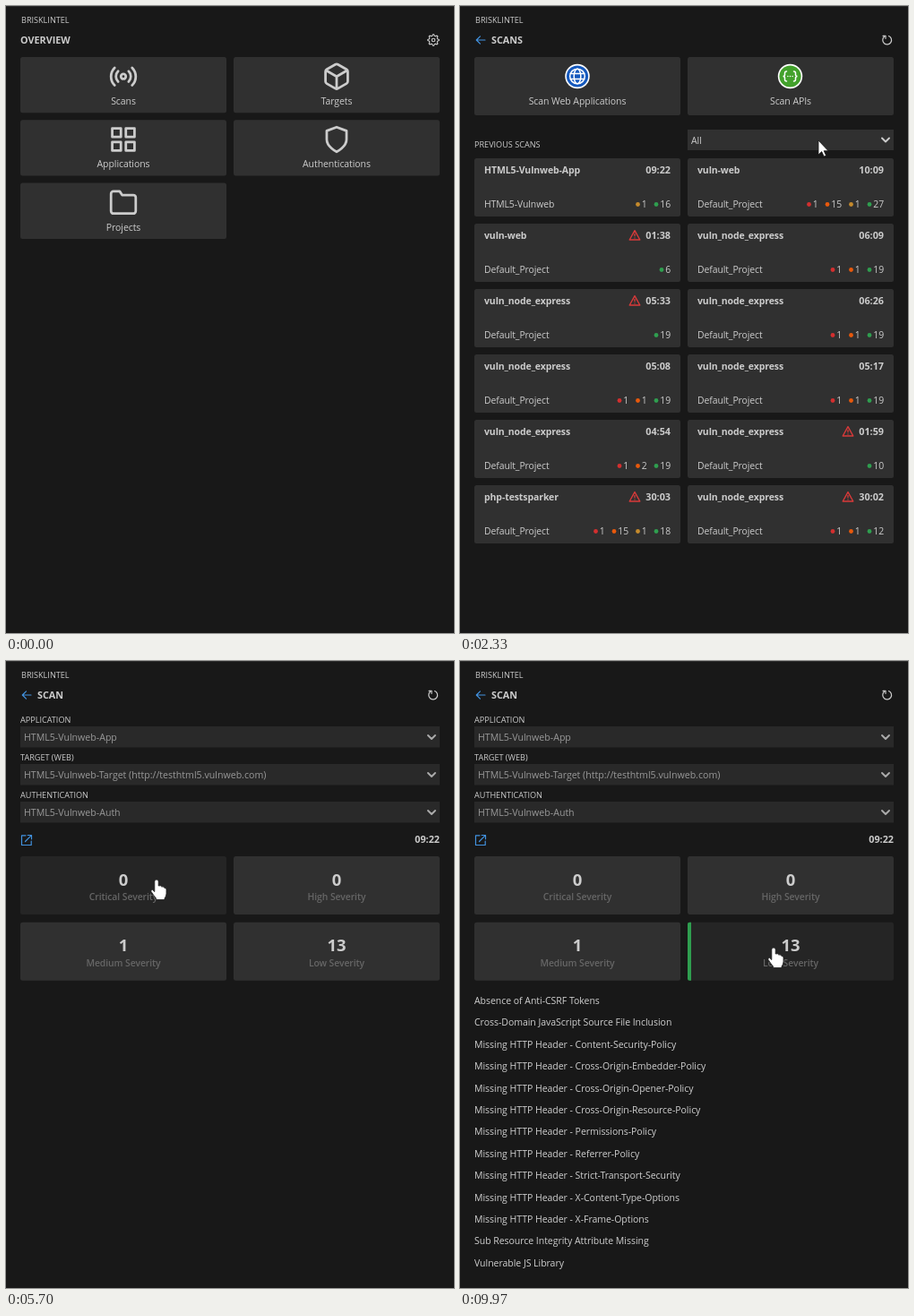
Write an HTML page that moves like this. It is 500x700 px and loops after 10000 ms.

```html
<!DOCTYPE html>
<html lang="en">
<head>
<meta charset="utf-8">
<title>Scan panel</title>
<style>
html, body { margin: 0; width: 100%; height: 100%; overflow: hidden; background: #181818; }
svg { display: block; width: 500px; height: 700px; }
text { font: 10.5px "Open Sans", "Noto Sans", sans-serif; letter-spacing: -.07px; fill: #ccc; white-space: pre; }
.caps { font-size: 9.1px; letter-spacing: 0; }
.head { font-size: 10.8px; font-weight: 700; letter-spacing: 0; }
.name { font-size: 10.5px; font-weight: 700; letter-spacing: -.1px; }
.time { font-size: 10.8px; font-weight: 700; letter-spacing: 0; }
.small { font-size: 10.4px; letter-spacing: -.08px; }
.field { font-size: 10.6px; letter-spacing: 0; }
.dim { fill: #999; }
.count { font-size: 18.5px; font-weight: 700; letter-spacing: 0; }
.sev { font-weight: 600; font-size: 10.4px; fill: #666; }
.row { letter-spacing: -.03px; fill: #d0d0d0; }
.pick { fill: #fff; }
.line { fill: none; stroke: #ccc; stroke-linecap: round; stroke-linejoin: round; }
.blue { stroke: #4292df; }
</style>
</head>
<body>
<svg id="stage" viewBox="0 0 500 700"></svg>
<script>
const LOOP = 10000;
const FILL = '#303030', HOVER = '#252525';
const SEV = ['#d32f2f', '#e8590c', '#c58a2c', '#2f9e4f'];
const COLS = [16, 254];

// Visible span of each layer, in ms
const SPANS = {
  overview: [0, 1360],
  scans: [1360, 4790],
  others: [1360, 3360],
  all: [1360, 3360],
  chosen: [3360, 4790],
  focus: [2500, 4790],
  menu: [2500, 3360],
  detail: [4790, LOOP],
  bar0: [5950, 6640],
  bar1: [6640, 7620],
  bar2: [7620, 8800],
  bar3: [8800, LOOP],
  none: [5950, 7620],
  single: [7620, 8800],
  list: [8800, LOOP]
};

// Pointer stops: time, x, y
const STOPS = [
  [330, 510, 374], [1100, 152, 92], [1360, 152, 92], [1640, 197, 112],
  [2150, 400, 150], [2500, 400, 150], [3050, 302, 202], [3420, 302, 202],
  [3900, 170, 200], [5390, 170, 200], [5690, 168, 244], [5950, 168, 244],
  [6480, 331, 253], [6640, 331, 253], [6980, 308, 270], [7150, 308, 270],
  [7600, 199, 322], [8120, 199, 322], [8300, 382, 241], [8520, 382, 241],
  [8760, 362, 316], [9330, 362, 316], [9900, 350, 320]
];

const text = (x, y, s, cls = '', anchor = 'start') =>
  `<text x="${x}" y="${y}" class="${cls}" text-anchor="${anchor}">${s}</text>`;
const rect = (x, y, w, h, fill, extra = '') =>
  `<rect x="${x}" y="${y}" width="${w}" height="${h}" fill="${fill}" ${extra}/>`;
const path = (d, width = 1.2, cls = '') =>
  `<path class="line ${cls}" d="${d}" stroke-width="${width}"/>`;
const circle = (x, y, r, fill, extra = '') =>
  `<circle cx="${x}" cy="${y}" r="${r}" fill="${fill}" ${extra}/>`;
const card = (x, y, h) => rect(x, y, 230, h, FILL, 'rx="2.5" class="card"');
const layer = (id, body) => `<g id="${id}">${body}</g>`;
const chevron = y => path(`M471 ${y - 2}l4 4 4-4`, 1.9);
const icon = (x, y, d) =>
  `<g transform="translate(${x} ${y}) scale(1.38) translate(-12 -12)">${path(d, 2)}</g>`;

function gear(x, y) {
  let d = '';
  for (let i = 0; i < 32; i++) {
    const a = (i - .5) * Math.PI / 16, r = i % 4 < 2 ? 6.3 : 4.7;
    d += `${i ? 'L' : 'M'}${x + r * Math.cos(a)} ${y + r * Math.sin(a)}`;
  }
  return path(d + 'Z', 1.1) + circle(x, y, 1.8, 'none', 'stroke="#ccc" stroke-width="1.1"');
}

const pageHead = title =>
  path('M28 38H18.5M22.5 33.8L18.3 38L22.5 42.2', 1.2, 'blue') +
  text(35, 42, title, 'head') +
  path('M478.5 33.5A4.9 4.9 0 1 1 473.5 34.3M472 33.3H475V36.3', 1.2);

function overview() {
  const tiles = [
    ['Scans', 'M10 12a2 2 0 1 0 4 0a2 2 0 1 0-4 0M16.24 7.76a6 6 0 0 1 0 8.49m-8.48-.01a6 6 0 0 1 0-8.49m11.31-2.82a10 10 0 0 1 0 14.14m-14.14 0a10 10 0 0 1 0-14.14'],
    ['Targets', 'M21 16V8a2 2 0 0 0-1-1.73l-7-4a2 2 0 0 0-2 0l-7 4A2 2 0 0 0 3 8v8a2 2 0 0 0 1 1.73l7 4a2 2 0 0 0 2 0l7-4A2 2 0 0 0 21 16zM3.3 7L12 12l8.7-5M12 22V12'],
    ['Applications', 'M3 3h7v7H3zM14 3h7v7h-7zM14 14h7v7h-7zM3 14h7v7H3z'],
    ['Authentications', 'M12 22s8-4 8-10V5l-8-3-8 3v7c0 6 8 10 8 10z'],
    ['Projects', 'M22 19a2 2 0 0 1-2 2H4a2 2 0 0 1-2-2V5a2 2 0 0 1 2-2h5l2 3h9a2 2 0 0 1 2 2z']
  ];
  return text(16, 42, 'OVERVIEW', 'head') + gear(477, 38) + tiles.map(([label, d], i) => {
    const x = COLS[i % 2], y = 57 + 70.3 * (i >> 1);
    return card(x, y, 62.3) + icon(x + 115, y + 21.7, d) +
      text(x + 115, y + 53, label, '', 'middle');
  }).join('');
}

function badge(x, fill, body) {
  return `<g transform="translate(${x} 78.5)">${circle(0, 0, 13.7, '#fff')}${circle(0, 0, 12.1, fill)}` +
    `<g fill="none" stroke="#fff" stroke-width="1.5" stroke-linecap="round">${body}</g></g>`;
}

function scansTop() {
  const globe = circle(0, 0, 8.3, 'none') + '<ellipse rx="3.8" ry="8.3"/><path d="M-7.6-3H7.6M-7.6 3H7.6"/>';
  const braces = '<path d="M-4-5.5Q-6-5.5-6-3.5V-2Q-6 0-8 0Q-6 0-6 2V3.5Q-6 5.5-4 5.5M4-5.5Q6-5.5 6-3.5V-2Q6 0 8 0Q6 0 6 2V3.5Q6 5.5 4 5.5M-2.6 0h.01M0 0h.01M2.6 0h.01"/>';
  return pageHead('SCANS') + card(16, 57, 65) + card(254, 57, 65) +
    badge(131, '#1559bd', globe) + badge(368.5, '#43a12c', braces) +
    text(131, 110, 'Scan Web Applications', '', 'middle') +
    text(369, 110, 'Scan APIs', '', 'middle') +
    text(16, 158, 'PREVIOUS SCANS', 'caps') +
    rect(254, 138, 230, 23, FILL) + chevron(149.5);
}

// Each count list runs critical, high, medium, low
function scanCard(i, [name, time, counts, failed, project = 'Default_Project']) {
  const x = COLS[i % 2], y = 170 + 73 * (i >> 1), right = x + 219;
  let out = card(x, y, 65) + text(x + 11, y + 17, name, 'name') +
    text(right, y + 17, time, 'time', 'end') + text(x + 11, y + 55, project, 'small');
  if (failed) {
    const wx = right - 40, wy = y + 13;
    out += `<path d="M${wx} ${wy - 5.3}L${wx + 5.8} ${wy + 5}H${wx - 5.8}Z" fill="none" stroke="#d83a3a" stroke-width="1.4" stroke-linejoin="round"/>` +
      `<path d="M${wx} ${wy - 2}v3.2M${wx} ${wy + 2.6}v1" stroke="#d83a3a" stroke-width="1.3"/>`;
  }
  let edge = right;
  for (let k = 3; k >= 0; k--) {
    if (!counts[k]) continue;
    const dot = edge - 6 * String(counts[k]).length - 4;
    out += text(edge, y + 55, counts[k], 'small', 'end') + circle(dot, y + 51.5, 2.4, SEV[k]);
    edge = dot - 10.5;
  }
  return out;
}

const NODE = 'vuln_node_express';
const SCANS = [
  ['HTML5-Vulnweb-App', '09:22', [0, 0, 1, 16], 0, 'HTML5-Vulnweb'],
  ['vuln-web', '10:09', [1, 15, 1, 27]],
  ['vuln-web', '01:38', [0, 0, 0, 6], 1],
  [NODE, '06:09', [1, 1, 0, 19]],
  [NODE, '05:33', [0, 0, 0, 19], 1],
  [NODE, '06:26', [1, 1, 0, 19]],
  [NODE, '05:08', [1, 1, 0, 19]],
  [NODE, '05:17', [1, 1, 0, 19]],
  [NODE, '04:54', [1, 2, 0, 19]],
  [NODE, '01:59', [0, 0, 0, 10], 1],
  ['php-testsparker', '30:03', [1, 15, 1, 18], 1],
  [NODE, '30:02', [1, 1, 0, 12], 1]
];

const menu = () =>
  rect(254.5, 162, 229, 49, FILL, 'stroke="#2a6fc4"') + rect(255, 194, 228, 16.5, '#1967d2') +
  ['All', 'Default_Project', 'HTML5-Vulnweb'].map((s, i) =>
    text(259, 174 + 16 * i, s, i === 2 ? 'pick' : '')).join('');

function detail() {
  const fields = [
    ['APPLICATION', 'HTML5-Vulnweb-App'],
    ['TARGET (WEB)', 'HTML5-Vulnweb-Target (http://testhtml5.vulnweb.com)'],
    ['AUTHENTICATION', 'HTML5-Vulnweb-Auth']
  ];
  const levels = [[0, 'Critical'], [0, 'High'], [1, 'Medium'], [13, 'Low']];
  return pageHead('SCAN') +
    fields.map(([label, value], i) => {
      const y = 73 + 42 * i;
      return text(16, y - 4, label, 'caps') + rect(16, y, 468, 23.5, '#292929') +
        text(20, y + 16, value, 'field dim') + `<g opacity=".8">${chevron(y + 12)}</g>`;
    }).join('') +
    path('M22 194.8H17.5V205.5H28.2V201M24.2 194.5H28.5V198.8M28.3 194.7L21.5 201.5', 1.2, 'blue') +
    text(484, 203, '09:22', 'time', 'end') +
    levels.map(([n, label], i) => {
      const x = COLS[i % 2], y = 218 + 73.7 * (i >> 1);
      return card(x, y, 65) +
        layer('bar' + i, `<path d="M${x + 4} ${y}h-2q-2 0-2 2v61q0 2 2 2h2z" fill="${SEV[i]}"/>`) +
        text(x + 115, y + 32.5, n, 'count', 'middle') +
        text(x + 115, y + 49, label + ' Severity', 'sev', 'middle');
    }).join('');
}

const HEADERS = ['Content-Security', 'Cross-Origin-Embedder', 'Cross-Origin-Opener',
  'Cross-Origin-Resource', 'Permissions', 'Referrer'].map(s => s + '-Policy')
  .concat('Strict-Transport-Security', 'X-Content-Type-Options', 'X-Frame-Options');
const ISSUES = ['Absence of Anti-CSRF Tokens', 'Cross-Domain JavaScript Source File Inclusion',
  ...HEADERS.map(s => 'Missing HTTP Header - ' + s),
  'Sub Resource Integrity Attribute Missing', 'Vulnerable JS Library'];
const rows = list => list.map((s, i) => text(16, 383 + 24.4 * i, s, 'row')).join('');

const HAND = 'M-2.2 2.2Q-2.2 0 0 0Q2.2 0 2.2 2.2V7Q5 6.2 5.7 8Q8.2 7.4 8.7 9.3Q11 9 11 11.2V16Q10.6 19 9 21V22.5H-.5V21Q-3 18-6 13.4Q-6.6 11-4.6 11.3L-2.2 13.6Z';
const ARROW = 'M0 0V16L3.7 12.6L6.2 18L8.6 17L6.2 11.7H11Z';

const stage = document.getElementById('stage');
stage.innerHTML =
  rect(0, 0, 500, 700, '#181818') + rect(0, 0, 500, 1, '#2b2b2b') +
  text(17, 19, 'BRISKLINTEL', 'caps') +
  layer('overview', overview()) +
  layer('scans', scansTop() + scanCard(0, SCANS[0])) +
  layer('others', SCANS.slice(1).map((s, i) => scanCard(i + 1, s)).join('')) +
  layer('all', text(258, 153.5, 'All')) +
  layer('chosen', text(258, 153.5, 'HTML5-Vulnweb')) +
  layer('focus', rect(253.5, 137.5, 231, 24, 'none', 'stroke="#2a6fc4"')) +
  layer('menu', menu()) +
  layer('detail', detail()) +
  layer('none', text(250, 396, 'No issues found!', 'row', 'middle')) +
  layer('single', rows(['HTTP Only Site'])) +
  layer('list', rows(ISSUES)) +
  '<path id="pointer" fill="#fff" stroke="#1a1a1a" stroke-width=".8"/>';

const layers = Object.keys(SPANS).map(id => [document.getElementById(id), id]);
const pointer = document.getElementById('pointer');
const cards = [...stage.querySelectorAll('.card')].map(el => {
  const [x, y, w, h] = ['x', 'y', 'width', 'height'].map(k => +el.getAttribute(k));
  return { el, x, y, w, h, id: el.parentNode.id };
});
const shown = (id, t) => t >= SPANS[id][0] && t < SPANS[id][1];

function pointerAt(t) {
  const i = STOPS.findIndex(s => s[0] > t);
  if (i < 0) return STOPS[STOPS.length - 1].slice(1);
  if (!i) return STOPS[0].slice(1);
  const [t0, x0, y0] = STOPS[i - 1], [t1, x1, y1] = STOPS[i];
  const p = (t - t0) / (t1 - t0), e = p * p * (3 - 2 * p);
  return [x0 + (x1 - x0) * e, y0 + (y1 - y0) * e];
}

function draw(t) {
  for (const [el, id] of layers) el.style.display = shown(id, t) ? '' : 'none';
  const [px, py] = pointerAt(t);
  let over = false;
  for (const c of cards) {
    const hit = shown(c.id, t) && !shown('menu', t) &&
      px >= c.x && px < c.x + c.w && py >= c.y && py < c.y + c.h;
    c.el.setAttribute('fill', hit ? HOVER : FILL);
    over = over || hit;
  }
  pointer.setAttribute('d', over ? HAND : ARROW);
  pointer.setAttribute('transform', `translate(${px} ${py})`);
}

const start = performance.now();
function tick() {
  draw((performance.now() - start) % LOOP);
  requestAnimationFrame(tick);
}
tick();
</script>
</body>
</html>
```
